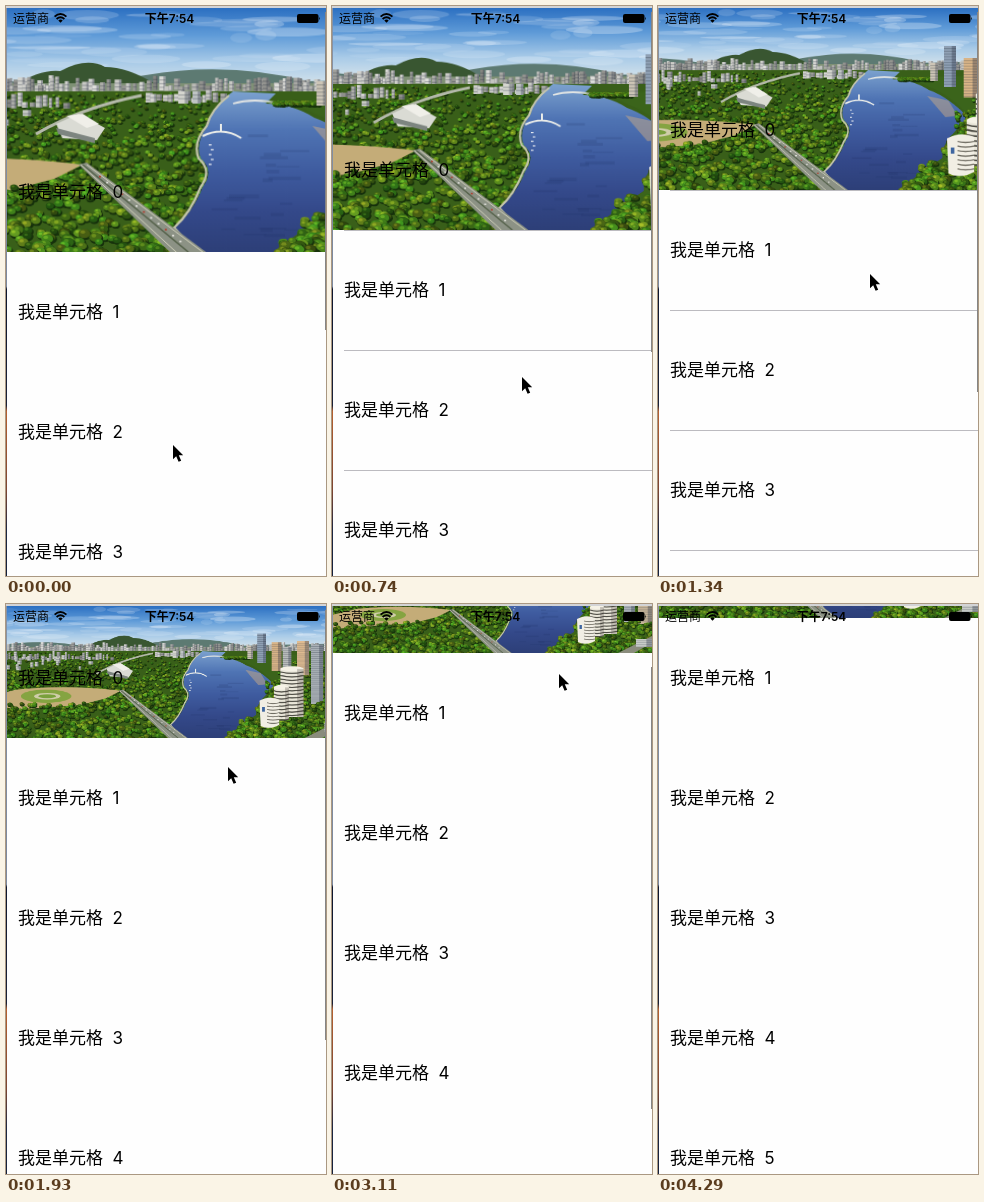
These frames come from a looping animation (320 by 570 pixels, 4890 ms). An HTML page with a canvas:

```html
<!DOCTYPE html>
<html lang="zh-CN">
<head>
<meta charset="utf-8">
<title>下拉放大</title>
<style>
html, body { margin: 0; width: 100%; height: 100%; overflow: hidden; background: #fefefe; }
#stage { position: relative; width: 320px; height: 570px; overflow: hidden; background: #fefefe; }
#photo { position: absolute; left: 0; top: 0; width: 320px; height: 120px; transform-origin: 50% 0; }
svg { position: absolute; left: 0; top: 0; }
text { font-family: Inter, "Noto Sans CJK SC", "Noto Sans CJK", sans-serif; white-space: pre; }
#rows { font-size: 17px; }
#lines { fill: #bcbbc0; }
</style>
</head>
<body>
<div id="stage">
  <canvas id="photo" width="640" height="240"></canvas>
  <svg width="320" height="570" viewBox="0 0 320 570">
    <defs>
      <linearGradient id="edge" x2="0" y2="1">
        <stop offset="0" stop-color="#8793a6"/><stop offset=".49" stop-color="#7c899f"/>
        <stop offset=".495" stop-color="#0e1730"/><stop offset=".7" stop-color="#1b2238"/>
        <stop offset=".71" stop-color="#b5602f"/><stop offset=".85" stop-color="#7d4532"/>
        <stop offset=".92" stop-color="#1c2742"/><stop offset="1" stop-color="#16213c"/>
      </linearGradient>
    </defs>
    <g id="list"><g id="lines"></g><g id="rows"></g></g>
    <rect id="bar" x="319" width="1" fill="#858585"/>
    <g id="status">
      <text x="7" y="16.5" font-size="12">运营商</text>
      <g fill="none" stroke="#000" stroke-width="1.9">
        <path d="M48.6 10.6Q54.5 5.4 60.4 10.6M50.6 12.9Q54.5 9.6 58.4 12.9"/>
      </g>
      <path d="M52.3 14.4Q54.5 12.6 56.7 14.4L54.5 16.8Z"/>
      <text x="163.5" y="16.5" font-size="12" font-weight="600" text-anchor="middle">下午7:54</text>
      <rect x="291" y="8" width="21.5" height="9" rx="2"/>
      <path d="M313 10.8q1.6 1.7 0 3.4z"/>
    </g>
    <path id="cursor" d="M0 0V14.2L3.2 11.2L5.6 16.8L8.2 15.7L5.8 10.3H10.2Z" stroke="#fff" stroke-width="1.4" paint-order="stroke"/>
    <rect width="320" height="2" fill="#d3d4d6"/>
    <rect y="2" width="1" height="568" fill="url(#edge)"/>
  </svg>
</div>
<script>
const $ = id => document.getElementById(id);

let seed = 11;
const rnd = (a = 1, b = 0) => {
  seed = (seed * 16807) % 2147483647;
  return b + (a - b) * seed / 2147483647;
};

function paintPhoto() {
  const g = $('photo').getContext('2d');
  g.scale(2, 2);
  const box = (c, x, y, w, h) => { g.fillStyle = c; g.fillRect(x, y, w, h); };
  const dot = (c, x, y, rx, ry = rx) => {
    g.fillStyle = c;
    g.beginPath();
    g.ellipse(x, y, rx, ry, 0, 0, 7);
    g.fill();
  };
  const poly = (c, d) => { g.fillStyle = c; g.fill(new Path2D(d)); };
  const line = (c, w, d) => { g.strokeStyle = c; g.lineWidth = w; g.stroke(new Path2D(d)); };
  const fade = (y0, y1, ...colors) => {
    const f = g.createLinearGradient(0, y0, 0, y1);
    colors.forEach((c, i) => f.addColorStop(i / (colors.length - 1), c));
    return f;
  };
  const tower = (c, x, y, w, h) => {
    box(c, x, y, w, h);
    box('rgba(40,50,70,.35)', x + w * .65, y, w * .35, h);
    for (let v = y + 1.5; v < y + h - 1; v += 1.8) box('rgba(40,50,65,.3)', x, v, w, .6);
  };
  const trees = (n, x0, x1, y0, y1) => {
    for (let i = 0; i < n; i++) {
      const y = y0 + (y1 - y0) * i / n, x = rnd(x1, x0);
      const r = .7 + (y - 40) / 80 * rnd(2.6, 1.2), hue = rnd(105, 76), lum = rnd(37, 16);
      dot('#16300c', x + .5, y + .7, r * 1.1, r * .85);
      dot(`hsl(${hue} 66% ${lum}%)`, x, y, r, r * .75);
      dot(`hsl(${hue - 8} 66% ${lum + 9}%)`, x - r * .25, y - r * .25, r * .4, r * .3);
    }
  };
  const skyline = (x0, x1, base, low, high) => {
    for (let x = x0; x < x1; x += rnd(4, 1.6)) {
      const h = rnd(high, low), k = rnd(225, 130) | 0;
      tower(`rgb(${k},${k},${k - 4})`, x, base - h + rnd(1.5), rnd(3.6, 1.6), h);
    }
  };

  // sky and clouds
  box(fade(0, 40, '#2c70c2', '#5f9bd8', '#a9cbe8', '#dde8ec'), 0, 0, 320, 42);
  for (let i = 0; i < 75; i++) {
    const y = rnd(30, 3);
    dot(`rgba(255,255,255,${rnd(.28, .06)})`, rnd(320), y, rnd(22, 5), rnd(2.6, .8));
  }

  // hills and distant city
  poly('#5d7a72', 'M0 37Q40 30 75 35T150 33T230 36L320 34V42H0Z');
  poly('#395631', 'M86 38Q98 30 108 31Q121 24 130 29Q141 29 154 37Z');
  box('#7f9175', 0, 37, 320, 6);
  skyline(0, 320, 40, 2, 7);
  skyline(0, 105, 42, 3, 10);
  skyline(205, 320, 41, 3, 9);

  // left bank
  box('#395f19', 0, 41, 320, 79);
  trees(1250, 0, 198, 42, 92);
  skyline(0, 110, 48, 2, 8);
  skyline(150, 188, 45, 2, 5);
  for (let i = 0; i < 24; i++) tower('#c6c9c3', rnd(98, 4), rnd(55, 43), rnd(4.5, 2), rnd(5, 2.5));
  line('#b4b9aa', 1.5, 'M96 62Q118 49 148 43');
  poly('#c4ac78', 'M0 82L24 76Q70 71 119 77L105 84L82 90L0 96Z');
  dot('#85a441', 51, 82, 23, 6);
  dot('#cfcda8', 52, 82, 12, 3);
  dot('#79a03c', 52, 82, 8, 1.8);
  trees(520, 0, 182, 88, 121);
  poly('#dadbd4', 'M106 57L117 52L130 59L126 65L109 64Z');
  poly('#7d8580', 'M106 59L125 64V66.5L107 62Z');
  poly('#f0efe9', 'M111 53L119 52L127 57L121 59Z');
  tower('#d5d6cf', 166, 41, 5, 6);
  tower('#bfc4c4', 173, 41, 4, 6);

  // river
  poly(fade(40, 120, '#7ea4d0', '#4f74b4', '#3f5ca0', '#34498a', '#2d3f78'),
    'M193 41Q182 49 181 57Q174 66 177 74Q184 80 178 88Q173 101 164 108L176 121H213Q228 108 242 99Q243 88 249 83L259 72Q245 58 233 54Q222 47 209 47L214 42Z');
  for (let i = 0; i < 22; i++) {
    const y = rnd(112, 62);
    box('rgba(30,45,95,.16)', rnd(222, 182), y, rnd(16, 4), rnd(2, .6));
  }
  poly('rgba(214,176,130,.45)', 'M232 58L246 61L252 71L244 72Z');
  line('#c5c6ad', 1.1, 'M191 43Q182 50 180 58Q173 66 176 74Q183 80 177 88Q172 101 164 108L175 120');
  line('#e2e5e4', .9, 'M193 47Q203 44 216 47');
  line('#eceeea', 1, 'M178 63Q188 58 197 64M187 61V57');
  for (let i = 0; i < 5; i++) box('#eef1f4', 181 + i % 2, 67 + i * 2.4, 1.4, .6);

  // avenue
  poly('#8c9285', 'M117 77L121 76L181 121H163Z');
  line('#56634c', .8, 'M119 77L171 120');
  line('#d1d0bb', .5, 'M118 77L165 120M121 77L178 120');
  for (let i = 0; i < 12; i++) box(i % 3 ? '#e5e5df' : '#b13c2d', 127 + i * 3.6, 82.5 + i * 2.9, 1, .8);

  // right bank
  poly('#3b641b', 'M207 46Q222 46 233 52Q247 57 259 71L249 83Q242 90 242 99Q226 109 213 121H320V43Z');
  trees(200, 213, 236, 46, 47.5);
  trees(330, 262, 320, 50, 92);
  trees(80, 251, 265, 68, 88);
  tower('#8fa0b4', 243, 25, 8, 27);
  tower('#cdc5b6', 234, 36, 5, 12);
  tower('#d9b487', 256, 33, 9, 26);
  tower('#b9bcbc', 266, 37, 8, 24);
  tower('#dfbb91', 279, 32, 11, 31);
  tower('#a9b0b6', 292, 35, 11, 54);
  tower('#c9b69b', 306, 42, 15, 49);
  trees(260, 242, 320, 88, 121);
  trees(70, 226, 250, 102, 121);
  trees(22, 215, 232, 114, 121);

  const roundTower = (x, y, w, h) => {
    box('#e9e6d9', x, y, w, h);
    dot('#f5f2e6', x + w / 2, y, w / 2, 2.2);
    for (let v = y + 3; v < y + h; v += 3.2) line('#504f47', 1.1, `M${x} ${v}q${w / 2} 2.4 ${w} 0`);
    box('rgba(60,55,50,.25)', x + w * .72, y, w * .28, h);
  };
  roundTower(264, 57, 21, 44);
  roundTower(258, 74, 14, 29);
  poly('#f1eee4', 'M245 86Q254 81 263 85V108Q254 113 246 109Z');
  for (let v = 88; v < 108; v += 3) line('#6d6a60', .8, `M252 ${v}q5 1.4 11 0`);
  box('#3d65a0', 247.5, 92, 2.4, 4);
  poly('#8a8c7c', 'M284 121L320 103V110L300 121Z');
  tower('#c9ccc9', 304, 106, 16, 8);
}

// step, header bottom, pointer x, pointer y
const keys = [
  [0, 246, 167, 439], [5, 224.5, 190, 371], [9, 184.5, 212, 268], [13, 134, 222, 163],
  [17, 81.5, 224, 102], [21, 49, 227, 70], [27, 14, 229, 36]
];

function track(k, col) {
  const last = keys.length - 1;
  if (k >= keys[last][0]) return keys[last][col];
  const i = keys.findIndex(p => p[0] > k) - 1;
  const slope = j => j < 1 || j >= last ? 0 :
    (keys[j + 1][col] - keys[j - 1][col]) / (keys[j + 1][0] - keys[j - 1][0]);
  const [a, b] = [keys[i], keys[i + 1]], d = b[0] - a[0], u = (k - a[0]) / d, w = 1 - u;
  return w * w * (1 + 2 * u) * a[col] + u * u * (3 - 2 * u) * b[col]
    + d * u * w * (w * slope(i) - u * slope(i + 1));
}

const LOOP = 4890, STEPS = 30, SHORT = [4, 12, 15, 16, 21, 28];
function stepAt(t) {
  let k = 0, end = 150;
  while (t >= end && k < STEPS - 1) end += SHORT.includes(++k) ? 140 : 150;
  return k;
}

function pose(k) {
  const half = Math.round(track(k, 1) * 2), y = half >> 1;
  const top = Math.min(2, y - 120), zoom = (y - top) / 120;
  $('photo').style.transform = `translateY(${top}px) scale(${zoom})`;
  $('list').setAttribute('transform', `translate(0 ${y})`);
  // hairlines only survive on half-pixel offsets
  $('lines').style.display = half & 1 ? '' : 'none';

  const over = y > 122, end = Math.round(over ? 570 - y : 448 + (122 - y) * .785);
  const start = over ? 6 : end - 442;
  $('bar').setAttribute('y', start);
  $('bar').setAttribute('height', end - start);
  $('bar').style.opacity = k < 28 ? 1 : k < 29 ? .4 : 0;

  $('cursor').setAttribute('transform', `translate(${Math.round(track(k, 2))} ${Math.round(track(k, 3))})`);
  $('cursor').style.display = k < 28 ? '' : 'none';
}

for (let i = 0; i < 6; i++) {
  $('rows').innerHTML += `<text x="12" y="${i * 120 - 54}">我是单元格  ${i}</text>`;
  $('lines').innerHTML += `<rect x="12" y="${i * 120}" width="308" height="1"/>`;
}

paintPhoto();
function tick() {
  pose(stepAt(performance.now() % LOOP));
  requestAnimationFrame(tick);
}
tick();
</script>
</body>
</html>
```
